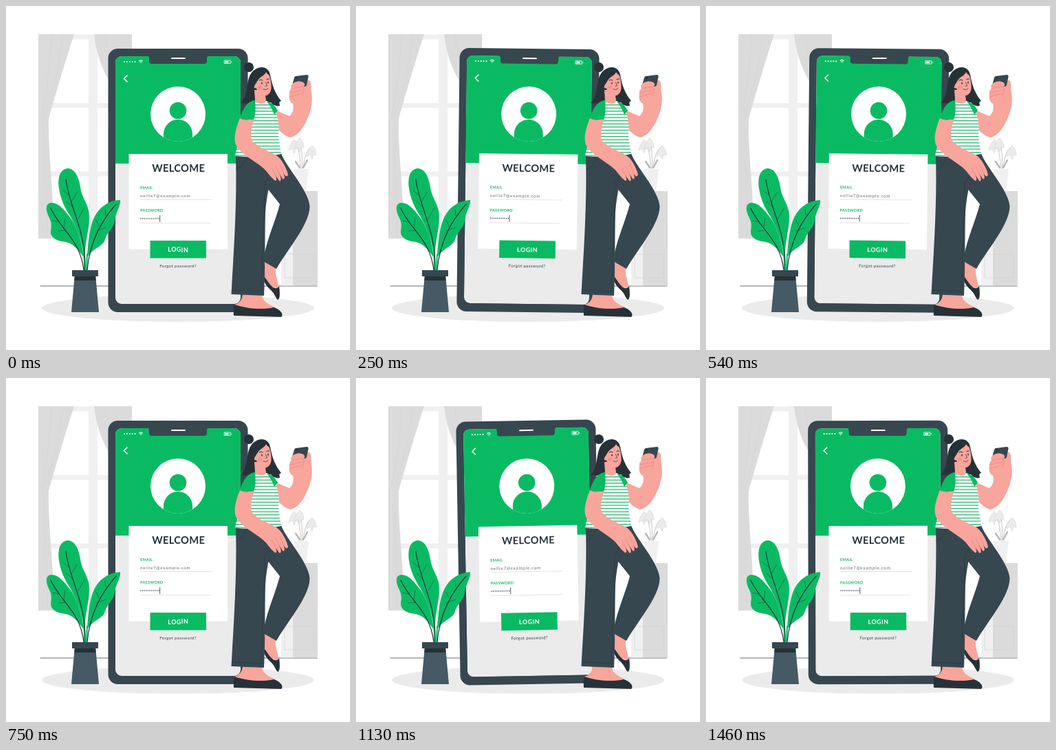
These frames come from a looping animation (500 px wide and 500 px high, 1500 ms). An HTML page:

```html
<!DOCTYPE html>
<html lang="en">
<head>
<meta charset="utf-8">
<title>Login illustration</title>
<style>
  html, body { margin: 0; width: 100%; height: 100%; overflow: hidden; background: #fff; }
  svg { display: block; width: 100%; height: 100%; font-family: Lato, sans-serif; }
  .green { fill: #0aba63; }
  .slate { fill: #37474f; }
  .ink { fill: #263238; }
  .skin { fill: #f8a59c; }
  .line { fill: none; stroke: #263238; stroke-linecap: round; stroke-linejoin: round; }
  .crease { fill: none; stroke: #e57f78; stroke-width: .6; }
  .label { font-size: 5.6px; font-weight: 700; letter-spacing: .25px; }
</style>
</head>
<body>
<svg viewBox="0 0 500 500">
  <defs>
    <pattern id="stripes" width="10" height="4.6" y="143" patternUnits="userSpaceOnUse">
      <rect width="10" height="4.6" fill="#fff"/>
      <rect width="10" height="1.4" fill="#35b878"/>
    </pattern>
    <clipPath id="screen"><rect x="159" y="73" width="182" height="360" rx="9"/></clipPath>
    <clipPath id="avatar"><circle cx="250" cy="157" r="40"/></clipPath>
  </defs>

  <!-- Room -->
  <g fill="none" stroke="#f0f0f0">
    <path stroke-width="7" d="M62 45H160M62 144.500H160M62 244H160"/>
    <path stroke-width="13" d="M126.500 41V337"/>
  </g>
  <path fill="#dbdbdb" d="M47 41H99C88 75 73 125 62 164C61 220 70 270 69 338H47Z"/>
  <path fill="#dbdbdb" d="M128 41H183V200H160C158 150 152 113 149 107C139 90 131 68 128 41Z"/>
  <path fill="none" stroke="#d3d3d3" stroke-width=".6" d="M82 42C78 90 66 130 55 160M66 42C64 90 58 130 52 160M56 170C55 230 60 280 60 337M144 42C146 65 150 85 158 102"/>
  <ellipse cx="250" cy="439" rx="198" ry="20" fill="#ebebeb"/>
  <path class="line" stroke-width=".7" d="M50 407H452"/>
  <path fill="#f0f0f0" d="M400 269H419V406.500H400Z"/>
  <path fill="#dbdbdb" d="M417 269H453V406.500H417Z"/>
  <path fill="none" stroke="#d1d1d1" stroke-width=".6" d="M405 361H447V395H405Z"/>

  <!-- Vase -->
  <path fill="#f0f0f0" d="M418 237H440L436 269H422Z"/>
  <g fill="none" stroke="#b8b8b8" stroke-linecap="round">
    <path stroke-width=".8" d="M428 236C428 215 424 204 419 197M430 236C431 215 430 203 426 193M431 236C435 217 438 205 445 206"/>
    <path stroke-width="2.500" d="M427 235L421 226M432 235L438 224"/>
  </g>
  <g fill="#ebebeb" stroke="#cfcfcf" stroke-width=".5">
    <path id="petal" d="M419 194C414 199 411 206 411 210L416 207L419 214L421 207L425 208C425 203 423 197 419 194Z"/>
    <use href="#petal" x="8" y="-2"/>
    <use href="#petal" x="26" y="9"/>
  </g>

  <!-- Swaying phone -->
  <g id="phone">
    <rect class="slate" x="148.500" y="62" width="203" height="383" rx="14"/>
    <g clip-path="url(#screen)">
      <path fill="#ebebeb" d="M159 73H341V433H159Z"/>
      <path class="green" d="M159 73H341V229H159Z"/>
    </g>
    <path class="slate" d="M205 72H295Q292 73 292 77V80Q292 84 288 84H212Q208 84 208 80V77Q208 73 205 72Z"/>
    <g fill="none" stroke="#fff" stroke-linecap="round">
      <path stroke-width="2" d="M241 76H260"/>
      <path stroke-width="2.200" stroke-dasharray="0 3.900" d="M172 81H188"/>
      <path stroke-width="1" d="M193.500 80Q196 77.800 198.500 80M194.800 81.500Q196 80.500 197.200 81.500M196 83V83"/>
      <path stroke-width="1.500" d="M176 101L171.500 105.500L176 110"/>
      <path stroke-width=".8" d="M317.500 79H326V83.500H317.500ZM327.700 80.700V82"/>
    </g>
    <path fill="#fff" d="M318.500 80H323.500V82.600H318.500Z"/>
    <circle cx="250" cy="157" r="40" fill="#fff"/>
    <g class="green" clip-path="url(#avatar)">
      <circle cx="250" cy="152" r="12.300"/>
      <path d="M229 200V186A21 21 0 0 1 271 186V200Z"/>
    </g>
    <path fill="#fff" d="M178.500 215H322V353.500H178.500Z"/>
    <text class="ink" x="250.700" y="241" text-anchor="middle" font-size="14.700" font-weight="700" letter-spacing=".3">WELCOME</text>
    <text class="green label" x="195" y="266">EMAIL</text>
    <text class="slate" x="195" y="278.300" font-size="6.300" letter-spacing=".72" opacity=".8">nellie7@example.com</text>
    <text class="green label" x="195" y="299.300">PASSWORD</text>
    <path stroke="#dcdcdc" stroke-width=".8" d="M195 281.500H300M195 315.500H298"/>
    <path class="line" stroke-width="1.500" stroke-dasharray="0 2.600" d="M196 309H222.500"/>
    <path class="line" stroke-width=".8" d="M223.700 304.500V313.500"/>
    <path class="green" d="M209.500 341H291V366.500H209.500Z"/>
    <text x="250.300" y="357.500" text-anchor="middle" font-size="8.900" font-weight="700" letter-spacing=".5" fill="#fff">LOGIN</text>
    <text class="slate" x="250" y="380" text-anchor="middle" font-size="6.300" letter-spacing=".3">Forgot password?</text>
  </g>

  <!-- Plant -->
  <g class="green">
    <path d="M113 362C110 340 103 322 93 305C84 291 79 279 77 265C75 250 78 237 90 236C101 237 106 250 108 263C110 280 121 288 121 306C121 327 115 340 115 362Z"/>
    <path d="M112 364C103 352 98 346 87 343C78 342 70 340 66 333C63 326 69 320 63 308C58 298 56 287 66 286C77 286 84 296 93 307C103 320 110 341 113 364Z"/>
    <path d="M118 364C119 347 121 324 127 310C134 294 147 283 166 282C167 291 159 300 158 312C156 324 147 328 144 339C141 350 129 350 119 364Z"/>
  </g>
  <path class="line" style="stroke:#0aba63" stroke-width="2" d="M113 360C114 369 114 376 114 384M118 361L117 384"/>
  <path class="line" stroke-width="1.200" d="M87 252C92 293 117 327 115 384M65 294C79 325 108 339 113 384M160 288C139 312 122 341 118 384"/>
  <path class="line" stroke-width=".5" d="M92 276L83 268M98 293L88 284M95 285L103 271M105 309L114 293M77 314L68 312M87 326L76 327M84 323L86 309M145 304L144 296M135 320L131 311M131 327L145 322"/>
  <path fill="#455a64" d="M100 390H130L135 445H95Z"/>
  <path class="ink" d="M100 392H130L130.600 399H99.400Z"/>
  <path class="slate" d="M96 384H134V393H96Z"/>

  <!-- Legs -->
  <path class="skin" d="M377 366L393 378C389 389 396 399 396 410C387 410 377 402 375 393Z"/>
  <path class="ink" d="M375 393C373 402 381 409 386 414C391 419 392 425 395 427C399 426 398 415 397 407C395 411 391 411 387 408C382 404 379 397 375 393Z"/>
  <path class="slate" d="M351 218L400 214C405 231 440 268 441.500 291C441 318 411 351 393 382L374 371C377 344 392 312 398 288L375 259Z"/>
  <path class="skin" d="M344 417H372C371 428 380 433 391 438L390 443H333L332 434C340 432 344 426 344 417Z"/>
  <path class="ink" d="M332 434C330 440 331 445 331 450L400 452C405 448 397 440 389 438C374 442 349 440 332 434Z"/>
  <path class="slate" d="M334 218L390 214C388 245 379 268 377 300C376 338 377 383 375 421L327.500 419C331 355 336 287 334 218Z"/>
  <path class="line" stroke-width=".5" d="M377 256C383 248 388 240 390 229M376 257C376 286 373 350 371 413M330 413L374 415M348 221C346 230 341 235 335 237"/>

  <!-- Back hair and raised arm -->
  <circle class="ink" cx="353" cy="89" r="7"/>
  <path class="ink" d="M357 97C366 86 381 86 384 100C387 116 391 127 400 138C397 139 397 140 398 145C392 147 384 141 379 138C366 143 350 142 341 141C353 130 348 108 357 97Z"/>
  <path class="skin" d="M391 151C399 154 406 158 412 160C417 156 419 148 417 142C411 139 411 132 412 126C411 119 422 118 430 116C435 113 436 107 441 108C445 112 442 119 444 126C447 143 441 160 433 174C427 184 420 190 413 191C404 189 399 181 391 177Z"/>
  <path class="slate" d="M421 102L437 100Q440 100 439.500 103L437 115Q436.500 117 434 117L418 118.500Q415 118 416 115L419 104Q420 102 421 102Z"/>
  <circle class="ink" cx="423" cy="104.500" r="1.300"/>
  <path class="skin" d="M414 116C418 109 427 108 432 111C436 113 434 118 430 118L415 120Z"/>
  <path class="crease" d="M414 120L431 117M413 126L431 122M412 132L430 127M431 117C435 120 432 128 430 132"/>

  <!-- Torso and resting arm -->
  <path fill="url(#stripes)" d="M362 137C370 141 379 140 385 140C392 146 395 162 397 176C394 190 399 202 400 215C378 220 354 220 333 218C336 198 347 180 354 164Z"/>
  <path class="skin" d="M361 122H376L378 137C377 144 364 143 362 137Z"/>
  <path class="green" d="M362 137C351 138 344 149 340 163C347 166 354 166 360 165C363 157 363 148 362 137Z"/>
  <path class="green" d="M379 139C388 140 392 147 395 152L390 158C387 150 383 143 379 139Z"/>
  <path class="skin" d="M340 163C346 166 354 166 361 165C356 177 355 186 357 195C367 206 380 210 391 216C400 220 408 236 410 245C408 250 406 247 403 243C406 249 405 253 402 251L397 243C401 251 400 256 397 254L391 245C395 252 393 257 389 252C381 245 379 239 372 234C359 224 344 216 336 205C329 195 334 178 340 163Z"/>
  <path class="crease" d="M398 230L404 244M392 233L398 246M386 235L392 247"/>

  <!-- Face -->
  <path class="skin" d="M363 108C367 103 374 99 379 95C384 100 386 112 385.500 120C384 130 377 132 371 129C365 126 362 116 363 108Z"/>
  <circle class="skin" cx="363" cy="116" r="3.500"/>
  <path class="ink" d="M357 97C367 87 380 87 384 101C381 100 379 98 378 96C376 101 370 102 366 108L363 113C359 116 361 133 351 140C352 125 350 108 357 97Z"/>
  <path class="line" stroke-width="1" d="M368 108Q370.500 106 373 108M379 106.500L382.500 106"/>
  <path class="line" stroke-width="1.500" d="M372 111.500V113M381 110.500V112"/>
  <path class="line" stroke-width=".7" d="M377.500 111L379.500 116L377 116.500M374 121Q378 123 381 120"/>
  <circle cx="369" cy="118" r="2.500" fill="#f2837c" opacity=".6"/>
</svg>
<script>
  const phone = document.getElementById("phone");
  const LOOP = 1500;

  // Linear sway: 0 to 1 to -1 to 0 degrees.
  function sway(p) {
    if (p < .25) return 4 * p;
    return p < .75 ? 2 - 4 * p : 4 * p - 4;
  }

  function draw(now) {
    const angle = sway(now % LOOP / LOOP);
    phone.setAttribute("transform", `rotate(${angle} 250 253.5)`);
    requestAnimationFrame(draw);
  }
  requestAnimationFrame(draw);
</script>
</body>
</html>
```
